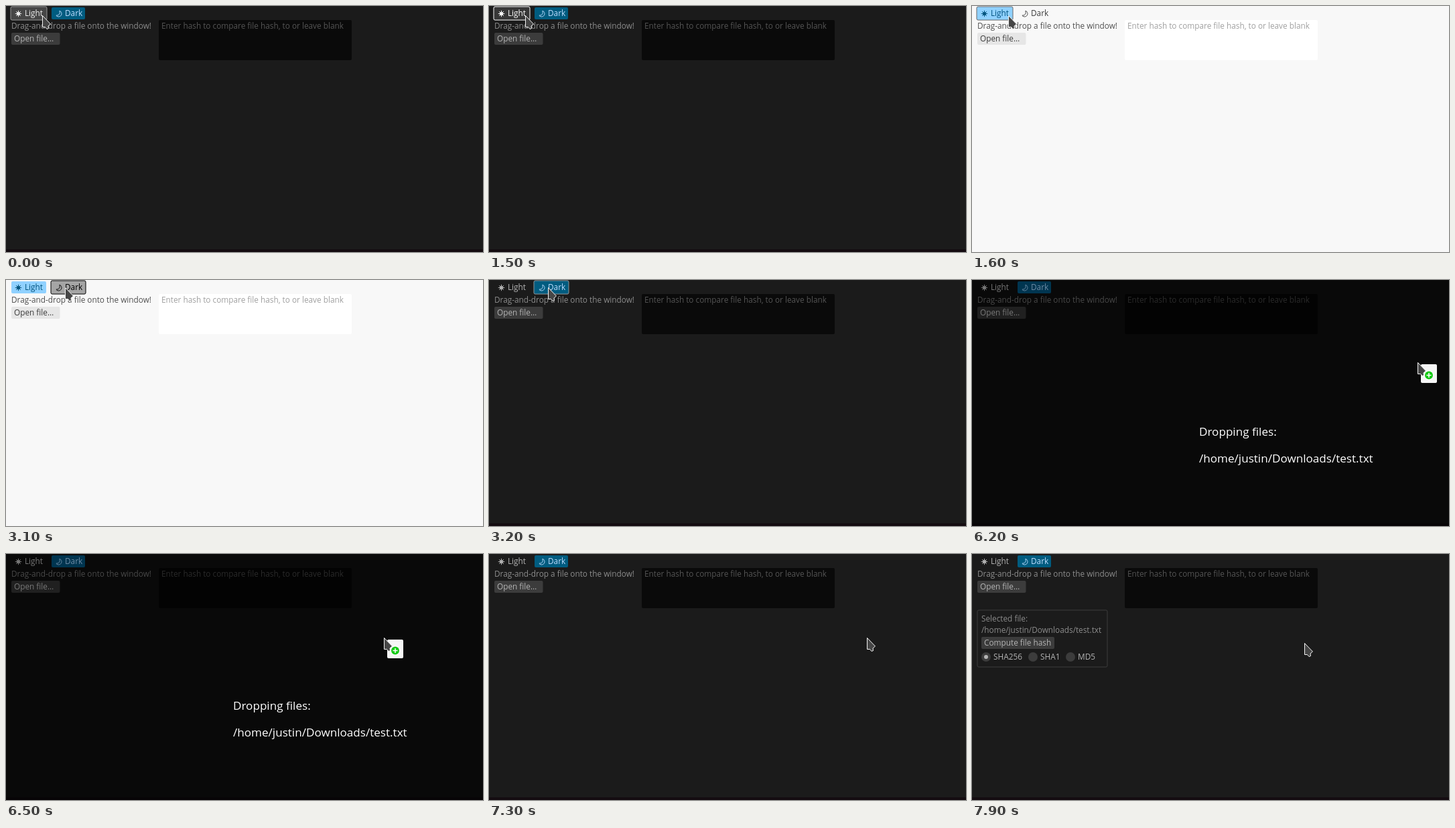
These frames come from a looping animation (712x368 px, 8 s). An HTML page with a canvas:

```html
<!DOCTYPE html>
<html lang="en">
<head>
<meta charset="utf-8">
<title>File hash window</title>
<style>
html, body { margin: 0; width: 100%; height: 100%; overflow: hidden; background: #1b1b1b; }
canvas { display: block; width: 712px; height: 368px; }
</style>
</head>
<body>
<canvas id="stage" width="712" height="368"></canvas>
<script>
const ctx = document.getElementById("stage").getContext("2d");
const LOOP = 8000;
const USER_FILE = "/home/justin/Downloads/test.txt";

const themes = {
  dark: {
    bg: "#1b1b1b", edge: "#140c11", text: "#8c8c8c", label: "#b4b4b4", hint: "#545454",
    box: "#0a0a0a", button: "#3c3c3c", pick: "#005c80", pickText: "#c0deff",
    hover: { fill: "#464646", line: "#969696", text: "#f0f0f0" },
    press: { fill: "#373737", line: "#ffffff", text: "#ffffff" }
  },
  light: {
    bg: "#f8f8f8", edge: "#f8f8f8", text: "#505050", label: "#3c3c3c", hint: "#a0a0a0",
    box: "#ffffff", button: "#e6e6e6", pick: "#90d1ff", pickText: "#00537d",
    hover: { fill: "#dcdcdc", line: "#696969", text: "#000000" },
    press: { fill: "#a5a5a5", line: "#000000", text: "#000000" }
  },
  dim: {
    bg: "#090909", edge: "#070406", text: "#484848", label: "#787878", hint: "#2a2a2a",
    box: "#030303", button: "#202020", pick: "#003550", pickText: "#6f8ca6"
  }
};

// [start, changes to the state]
const steps = [
  [0, { theme: "dark", x: 54, y: 14, hot: "light", down: false, drag: false, chosen: false }],
  [1500, { down: true }],
  [1600, { theme: "light", down: false }],
  [2600, { x: 63, y: 16, hot: "" }],
  [2700, { x: 79, y: 14, hot: "dark" }],
  [2800, { x: 88, y: 11 }],
  [3100, { down: true }],
  [3200, { theme: "dark", down: false }],
  [3800, { x: 86, y: 19 }],
  [4000, { x: 140, y: 26, hot: "" }],
  [4100, { x: 290, y: 45, hot: "box" }],
  [4200, { x: 400, y: 60 }],
  [4500, { x: 655, y: 100, hot: "" }],
  [4600, { x: -50 }],
  [6200, { theme: "dim", x: 665, y: 123, drag: true }],
  [6300, { x: 613, y: 124 }],
  [6400, { x: 578, y: 125 }],
  [6500, { x: 564 }],
  [7300, { theme: "dark", drag: false }],
  [7400, { chosen: true }],
  [7900, { x: 496, y: 133 }]
];

function stateAt(t) {
  return Object.assign({}, ...steps.filter(s => s[0] <= t).map(s => s[1]));
}

function text(str, x, y, color, size = 11.8) {
  ctx.font = `${size}px "Open Sans", "Noto Sans", sans-serif`;
  ctx.fillStyle = color;
  ctx.fillText(str, x, y);
}

function panel(x, y, w, h, fill, line) {
  ctx.beginPath();
  ctx.roundRect(x, y, w, h, 2);
  if (fill) {
    ctx.fillStyle = fill;
    ctx.fill();
  }
  if (line) {
    ctx.strokeStyle = line;
    ctx.lineWidth = 1;
    ctx.stroke();
  }
}

function disc(x, y, r, color) {
  ctx.beginPath();
  ctx.arc(x, y, r, 0, 2 * Math.PI);
  ctx.fillStyle = color;
  ctx.fill();
}

function sun(x, y, color) {
  disc(x, y, 2.5, color);
  ctx.strokeStyle = color;
  ctx.lineWidth = 1;
  ctx.beginPath();
  for (let i = 0; i < 8; i++) {
    const c = Math.cos(i * Math.PI / 4), s = Math.sin(i * Math.PI / 4);
    ctx.moveTo(x + c * 2, y + s * 2);
    ctx.lineTo(x + c * 4.7, y + s * 4.7);
  }
  ctx.stroke();
}

function moon(x, y, color) {
  ctx.beginPath();
  ctx.arc(x, y, 4.5, -1.25, 2.5);
  ctx.quadraticCurveTo(x + 3.2, y + 2.4, x + 1.4, y - 4.3);
  ctx.strokeStyle = color;
  ctx.lineWidth = 0.9;
  ctx.stroke();
}

function themeButton(name, x, w, icon, title, s, c) {
  const picked = (s.theme === "light" ? "light" : "dark") === name;
  const look = s.hot === name && (s.down ? c.press : c.hover);
  if (look) panel(x - 1, 1, w + 2, 20, picked ? c.pick : look.fill, look.line);
  else if (picked) panel(x, 2, w, 18, c.pick);
  const color = picked ? c.pickText : look ? look.text : c.label;
  icon(x + 10.5, 11.5, color);
  text(title, x + 20, 15, color);
}

function hashBox(hot, c) {
  if (hot) panel(227, 20, 290, 62, c.box, c.hover.line);
  else panel(228, 21, 288, 60, c.box);
  text("Enter hash to compare file hash, to or leave blank", 232, 34, c.hint);
}

function radio(x, title, on, c) {
  disc(x, 154, 7, c.button);
  if (on) disc(x, 154, 3, c.label);
  text(title, x + 11, 158, c.label);
}

function fileGroup(c) {
  panel(8, 84, 194, 85, null, c.button);
  text("Selected file:", 14, 101, c.text);
  text(USER_FILE, 14, 118, c.text);
  panel(14, 124, 109, 18, c.button);
  text("Compute file hash", 18, 137, c.label);
  radio(21, "SHA256", true, c);
  radio(91, "SHA1", false, c);
  radio(147, "MD5", false, c);
}

function arrow(x, y) {
  const shape = [[0.5, 0.5], [0.5, 17.5], [4.5, 17.5], [7, 20.5], [9.5, 19.5], [9, 16], [12.5, 13]];
  ctx.beginPath();
  shape.forEach(([px, py]) => ctx.lineTo(x + px, y + py));
  ctx.closePath();
  ctx.fillStyle = "#464646";
  ctx.fill();
  ctx.strokeStyle = "#f4f4f4";
  ctx.lineWidth = 1;
  ctx.lineJoin = "round";
  ctx.stroke();
}

function textCursor(x, y) {
  const bars = [[-4, -9, 8, 2], [-1, -9, 2, 18], [-4, 7, 8, 2]];
  ctx.fillStyle = "#f4f4f4";
  bars.forEach(([bx, by, w, h]) => ctx.fillRect(x + bx - 1, y + by - 1, w + 2, h + 2));
  ctx.fillStyle = "#464646";
  bars.forEach(([bx, by, w, h]) => ctx.fillRect(x + bx, y + by, w, h));
}

function draggedFile(x, y) {
  panel(x + 5, y + 3, 24, 28, "#f6f6f6");
  arrow(x, y);
  disc(x + 17, y + 19.5, 7, "#ffffff");
  disc(x + 17, y + 19.5, 6, "#16c916");
  ctx.fillStyle = "#ffffff";
  ctx.fillRect(x + 13.5, y + 18.75, 7, 1.5);
  ctx.fillRect(x + 16.25, y + 16, 1.5, 7);
}

function pointer(s) {
  if (s.drag) draggedFile(s.x, s.y);
  else if (s.hot === "box") textCursor(s.x, s.y);
  else arrow(s.x, s.y);
}

function draw(t) {
  const s = stateAt(t), c = themes[s.theme];
  ctx.fillStyle = c.bg;
  ctx.fillRect(0, 0, 712, 368);
  ctx.fillStyle = c.edge;
  ctx.fillRect(0, 364, 712, 4);

  themeButton("light", 8, 52, sun, "Light", s, c);
  themeButton("dark", 68, 50, moon, "Dark", s, c);
  text("Drag-and-drop a file onto the window!", 8, 34, c.text);
  panel(8, 40, 72.5, 18, c.button);
  text("Open file…", 12, 53, c.label);
  hashBox(s.hot === "box", c);

  if (s.chosen) fileGroup(c);
  if (s.drag) {
    text("Dropping files:", 339, 233, "#ffffff", 17.1);
    text(USER_FILE, 339, 273, "#ffffff", 17.1);
  }
  pointer(s);
}

function tick() {
  draw(performance.now() % LOOP);
  requestAnimationFrame(tick);
}
tick();
</script>
</body>
</html>
```
